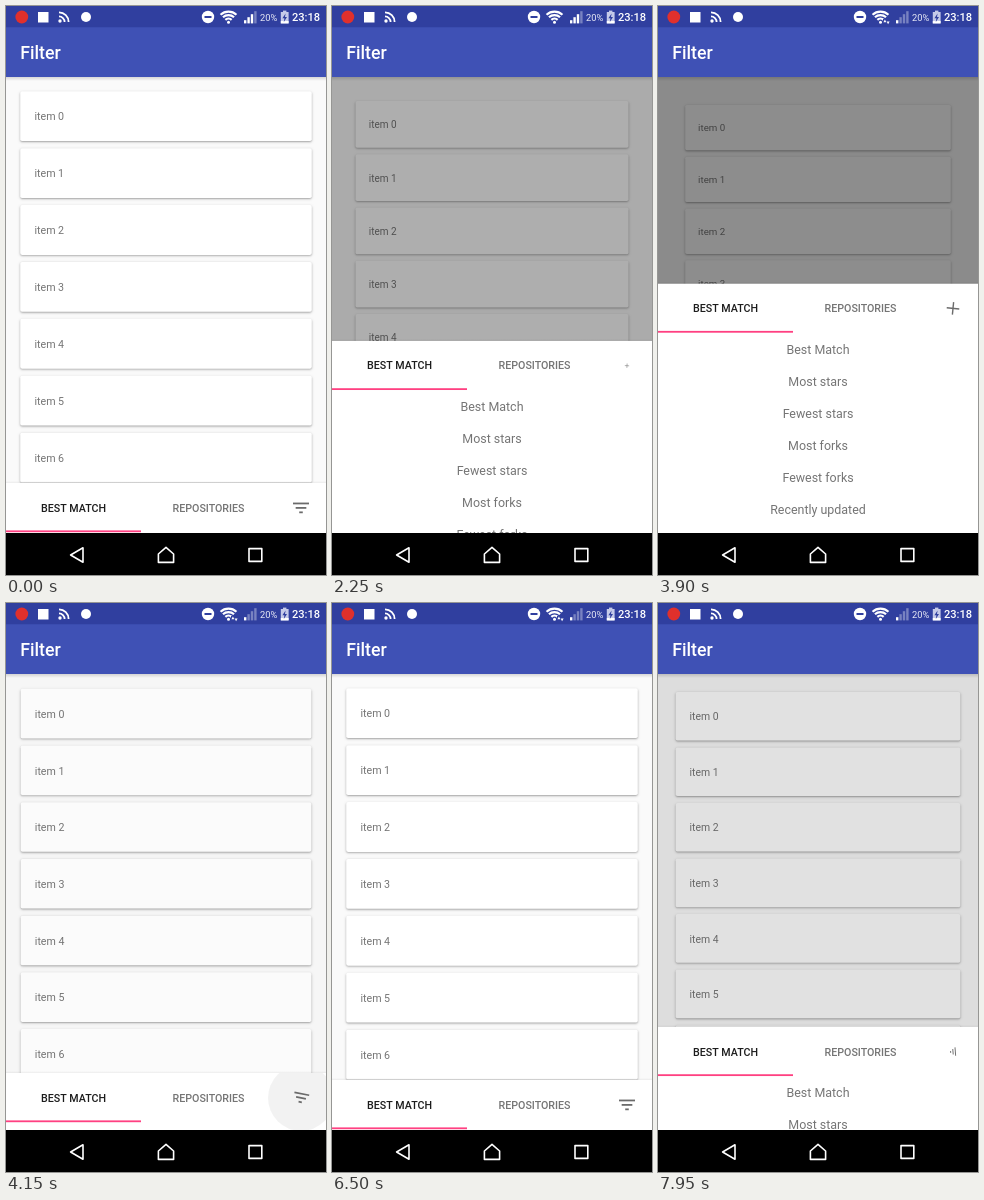
Write an HTML page with a canvas that moves like this. It is 320 px wide and 569 px high and loops after 8 s.

```html
<!DOCTYPE html>
<html lang="en">
<head>
<meta charset="utf-8">
<title>Filter sheet</title>
<style>
html, body { margin: 0; width: 100%; height: 100%; overflow: hidden; background: #000; }
canvas { display: block; width: 320px; height: 569px; }
</style>
</head>
<body>
<canvas id="stage"></canvas>
<script>
const W = 320, H = 569, LOOP = 8000, STEP = 50;
const BAR_BOTTOM = 71, NAV_TOP = 527;
const SHEET_CLOSED = 477, SHEET_OPEN = 253;
const FONT = 'Roboto, "Noto Sans", sans-serif';
const OPTIONS = ['Best Match', 'Most stars', 'Fewest stars', 'Most forks',
  'Fewest forks', 'Recently updated', 'Least recently updated'];
// Each tap on the filter button: start, duration, sheet state afterwards
const TAPS = [
  { at: 2146, dur: 570, open: 1 },
  { at: 3888, dur: 524, open: 0 },
  { at: 7923, dur: 512, open: 1 }
];

const canvas = document.getElementById('stage');
const ctx = canvas.getContext('2d');
const dpr = window.devicePixelRatio || 1;
canvas.width = Math.round(W * dpr);
canvas.height = Math.round(H * dpr);

const clamp = v => Math.max(0, Math.min(1, v));
const easeOut = v => 1 - Math.pow(1 - clamp(v), 5);

function rect(x, y, w, h, color) {
  ctx.fillStyle = color;
  ctx.fillRect(x, y, w, h);
}

function disc(x, y, r, color) {
  ctx.fillStyle = color;
  ctx.beginPath();
  ctx.arc(x, y, r, 0, Math.PI * 2);
  ctx.fill();
}

function path(points, closed) {
  ctx.beginPath();
  points.forEach(([x, y], i) => i ? ctx.lineTo(x, y) : ctx.moveTo(x, y));
  if (closed) ctx.closePath();
}

// y is the middle of the capitals
function text(str, x, y, size, color, weight = 400, align = 'left') {
  ctx.font = `${weight} ${size}px ${FONT}`;
  ctx.textAlign = align;
  ctx.fillStyle = color;
  ctx.fillText(str, x, y + size * 0.355);
}

function shade(y, h, from, to) {
  const g = ctx.createLinearGradient(0, y, 0, y + h);
  g.addColorStop(0, `rgba(0,0,0,${from})`);
  g.addColorStop(1, `rgba(0,0,0,${to})`);
  rect(0, y, W, h, g);
}

function lastTap(t) {
  return TAPS.filter(tap => tap.at <= t).pop();
}

function openness(t) {
  const tap = lastTap(t);
  if (!tap) return 0;
  const e = easeOut((t - tap.at) / tap.dur);
  return tap.open ? e : 1 - e;
}

function drawCards(p) {
  const scale = 1 - 0.1 * p;
  rect(0, BAR_BOTTOM, W, NAV_TOP - BAR_BOTTOM, '#fafafa');
  ctx.save();
  ctx.translate(160, 238);
  ctx.scale(scale, scale);
  ctx.translate(-160, -238);
  for (let i = 0; i < 8; i++) {
    const y = 85.3 + i * 56.89;
    ctx.save();
    ctx.shadowColor = 'rgba(0,0,0,.36)';
    ctx.shadowBlur = 2.2 * dpr;
    ctx.shadowOffsetY = 0.9 * dpr;
    ctx.fillStyle = '#fff';
    ctx.beginPath();
    ctx.roundRect(14.2, y, 291.6, 49.8, 1.8);
    ctx.fill();
    ctx.restore();
    text('item ' + i, 28.4, y + 25.4, 10.67, '#757575');
  }
  ctx.restore();
  shade(BAR_BOTTOM, 4, 0.14, 0);
  rect(0, BAR_BOTTOM, W, NAV_TOP - BAR_BOTTOM, `rgba(0,0,0,${0.5 * p})`);
}

// Filter lines spin and shrink away, then the cross grows in
function drawToggle(y, p) {
  const scale = Math.abs(1 - 2 * p);
  ctx.save();
  ctx.translate(295, y);
  ctx.rotate(p * Math.PI * 2);
  ctx.scale(scale, scale);
  if (p < 0.5) {
    [16, 10.67, 3.56].forEach((w, i) =>
      rect(-w / 2, (i - 1) * 4.44 - 0.89, w, 1.78, '#6b6b6b'));
  } else {
    ctx.strokeStyle = '#6b6b6b';
    ctx.lineWidth = 1.78;
    for (const s of [1, -1]) {
      path([[-5.7, -5.7 * s], [5.7, 5.7 * s]]);
      ctx.stroke();
    }
  }
  ctx.restore();
}

function drawRipple(t, y) {
  const tap = lastTap(t);
  if (!tap) return;
  const age = t - tap.at;
  const alpha = 0.05 * clamp((age - 100) / 120) * clamp((560 - age) / 250);
  if (alpha > 0) disc(295, y, 33 * clamp(age / 240), `rgba(0,0,0,${alpha})`);
}

function drawSheet(t, p) {
  const top = SHEET_CLOSED + (SHEET_OPEN - SHEET_CLOSED) * p;
  const mid = top + 24.9;
  shade(top - 2, 2, 0, 0.06);
  ctx.save();
  ctx.beginPath();
  ctx.rect(0, top, W, NAV_TOP - top);
  ctx.clip();
  rect(0, top, W, H, '#fff');
  drawRipple(t, mid);
  text('BEST MATCH', 67.5, mid, 10.67, '#1c1c1c', 500, 'center');
  text('REPOSITORIES', 202.5, mid, 10.67, '#757575', 500, 'center');
  rect(0, top + 47.4, 135, 1.8, '#ff4081');
  drawToggle(mid, p);
  OPTIONS.forEach((name, i) =>
    text(name, 160, top + 66 + i * 32, 12.44, '#757575', 400, 'center'));
  ctx.restore();
}

function drawWifi(busy) {
  ctx.strokeStyle = '#fff';
  ctx.lineWidth = 2.2;
  for (const r of [11.6, 8.1, 4.6]) {
    ctx.beginPath();
    ctx.arc(222.5, 17.2, r, -Math.PI * 0.74, -Math.PI * 0.26);
    ctx.stroke();
  }
  disc(222.5, 16.2, 1.5, '#fff');
  if (!busy) return;
  rect(225, 13, 7, 6, '#303f9f');
  ctx.fillStyle = '#fff';
  path([[225.4, 16.2], [226.9, 13.6], [228.4, 16.2]], true);
  ctx.fill();
  path([[228.6, 15.4], [230.1, 18.2], [231.6, 15.4]], true);
  ctx.fill();
}

function drawStatus(t) {
  rect(0, 0, W, 21.3, '#303f9f');
  disc(15.8, 11, 6.4, '#e0302c');
  rect(32, 6, 10.5, 10.5, '#fff');

  disc(54, 15, 1.7, '#fff');
  ctx.strokeStyle = '#fff';
  ctx.lineWidth = 1.8;
  for (const r of [5.6, 9.6]) {
    ctx.beginPath();
    ctx.arc(53, 16, r, -Math.PI / 2, 0);
    ctx.stroke();
  }

  disc(80, 11, 5, '#fff');
  disc(202, 11, 6.2, '#fff');
  rect(198.5, 10, 7, 2, '#303f9f');
  drawWifi(t >= 3500 && t < 7500);

  const lit = t < 3700 ? 3 : 1;
  for (let i = 0; i < 4; i++) {
    const h = 3.2 + i * 3;
    rect(238 + i * 3.4, 17.4 - h, 2.4, h, i < lit ? '#fff' : 'rgba(255,255,255,.35)');
  }

  text('20%', 254, 11.2, 9.3, '#e8eaf6');
  rect(277, 4.6, 3.4, 1.6, '#c5cae9');
  rect(274.8, 6, 7.8, 11.4, '#c5cae9');
  rect(274.8, 15, 7.8, 2.4, '#fff');
  ctx.fillStyle = '#303f9f';
  path([[279.6, 7.4], [276.4, 12.2], [278.4, 12.2], [277.8, 16], [281, 11], [279, 11]], true);
  ctx.fill();
  text('23:18', 286, 11.2, 11.1, '#fff', 500);
}

function drawNav() {
  rect(0, NAV_TOP, W, H - NAV_TOP, '#000');
  ctx.strokeStyle = '#fff';
  ctx.lineWidth = 1.6;
  ctx.lineJoin = 'round';
  path([[64.6, 549], [77, 541.8], [77, 556.2]], true);
  ctx.stroke();
  path([[160, 541.4], [167.6, 548], [167.6, 556.4], [152.4, 556.4], [152.4, 548]], true);
  ctx.stroke();
  ctx.strokeRect(243, 542.6, 12.8, 12.8);
}

function draw(t) {
  const p = openness(t);
  ctx.setTransform(dpr, 0, 0, dpr, 0, 0);
  drawCards(p);
  drawSheet(t, p);
  rect(0, 21, W, BAR_BOTTOM - 21, '#3f51b5');
  text('Filter', 14.2, 47, 17.78, '#fff', 500);
  drawStatus(t);
  drawNav();
}

const start = performance.now();
function tick() {
  const t = (performance.now() - start) % LOOP;
  draw(Math.floor(t / STEP) * STEP);
  requestAnimationFrame(tick);
}
tick();
</script>
</body>
</html>
```
